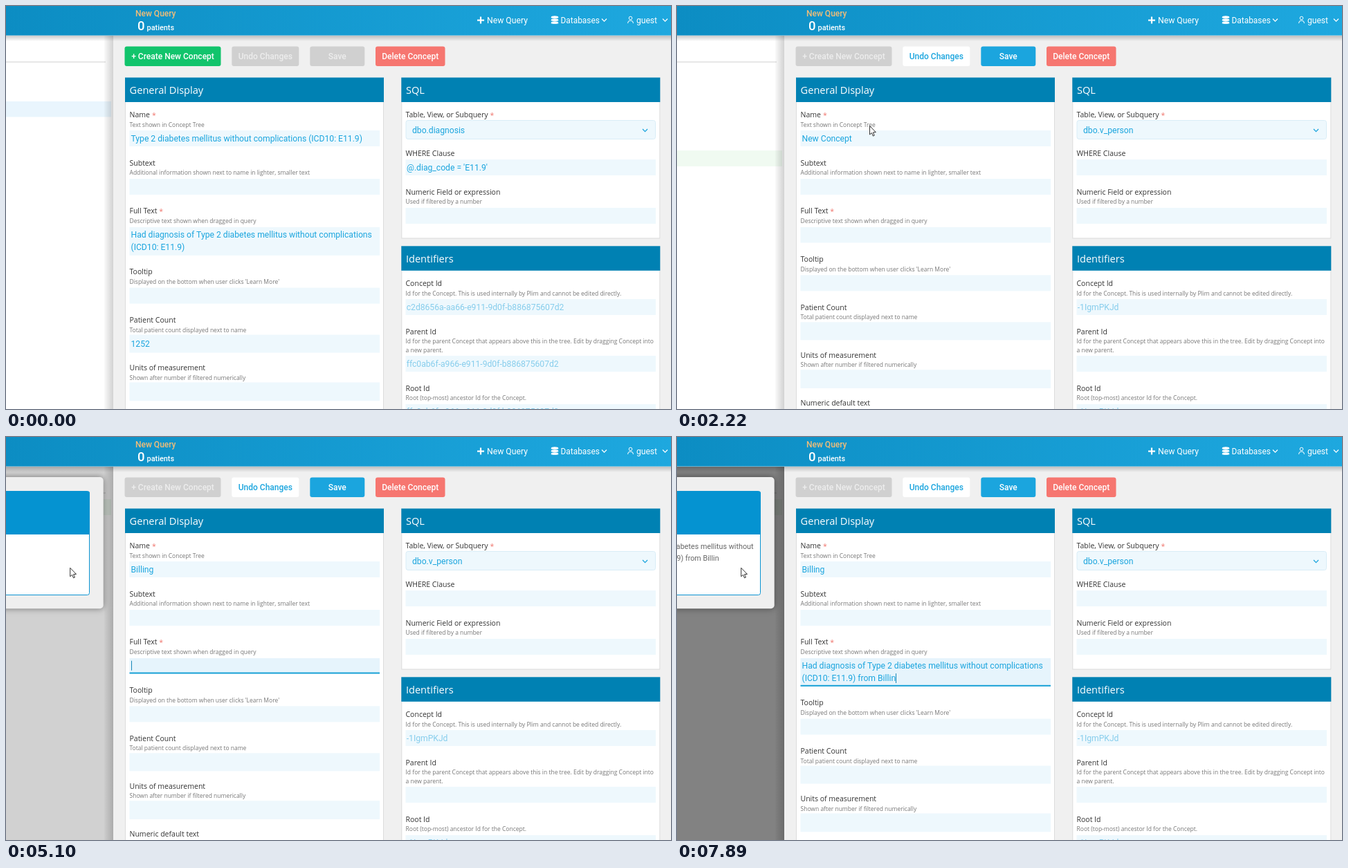
An HTML page with a canvas for the animation above (8000 ms loop, 961 by 583 pixels).

```html
<!DOCTYPE html>
<html lang="en">
<head>
<meta charset="utf-8">
<title>Concept editor</title>
<style>
html, body { margin: 0; width: 100%; height: 100%; overflow: hidden; background: #f0f0f0; }
canvas { display: block; width: 961px; height: 583px; }
</style>
</head>
<body>
<canvas id="stage" width="961" height="583"></canvas>
<script>
const ctx = document.getElementById('stage').getContext('2d');
const LOOP = 8000;
const CREATED = 1910, PASTED = 5800;
const EDGE = 155;
const BLUE = '#1ba5de', FIELD = '#eef8fd', FOCUS = '#e6f4fc', FADED = '#86cdec';
const ROBOTO = 'Roboto, sans-serif', OPEN = '"Open Sans", sans-serif';
const DIAGNOSIS = 'Type 2 diabetes mellitus without complications';
let t = 0;

// Drawing helpers. Text is placed by the middle of its capitals.
function text(s, x, y, size, color, weight = 500, family = ROBOTO, align = 'left') {
  ctx.font = `${weight} ${size}px ${family}`;
  ctx.fillStyle = color;
  ctx.textAlign = align;
  ctx.fillText(s, x, y + size * 0.355);
  return ctx.measureText(s).width;
}
const value = (s, x, y, color = BLUE) => text(s, x, y, 12.15, color, 400);
function rect(x, y, w, h, color) {
  ctx.fillStyle = color;
  ctx.fillRect(x, y, w, h);
}
function round(x, y, w, h, r, fill, stroke) {
  ctx.beginPath();
  ctx.roundRect(x, y, w, h, r);
  ctx.fillStyle = fill;
  ctx.fill();
  if (stroke) { ctx.strokeStyle = stroke; ctx.lineWidth = 1; ctx.stroke(); }
}
function shade(x, y, w, h, x1, y1, x2, y2, from, to) {
  const g = ctx.createLinearGradient(x1, y1, x2, y2);
  g.addColorStop(0, from);
  g.addColorStop(1, to);
  rect(x, y, w, h, g);
}
function line(points, color, width) {
  ctx.beginPath();
  points.forEach(([x, y]) => ctx.lineTo(x, y));
  ctx.strokeStyle = color;
  ctx.lineWidth = width;
  ctx.stroke();
}
function chevron(x, y, color) {
  line([[x - 3.5, y - 2], [x, y + 1.6], [x + 3.5, y - 2]], color, 1.3);
}

// Timing helpers.
const between = (a, b) => t >= a && t < b;
const typed = (s, times) => s.slice(0, times.filter(k => t >= k).length);
const latest = keys => keys.reduce((v, [k, next]) => t >= k ? next : v, keys[0][1]);
const stepped = (from, to, steps) =>
  Math.min(1, Math.max(0, Math.floor((t - from) / (to - from) * (steps - 1) + 0.01) / (steps - 1)));
const mix = (a, b, p) => a + (b - a) * p;
const glide = (a, b, p) => [mix(a[0], b[0], p), mix(a[1], b[1], p)];

function caret(x, y) { rect(Math.round(x), y - 7, 1, 14, '#1787b8'); }

function header() {
  shade(0, 43, 961, 8, 0, 43, 0, 51, 'rgba(0,0,0,.2)', 'rgba(0,0,0,0)');
  shade(0, 0, 961, 42.6, 0, 0, 961, 0, '#0c8dc3', '#1ea8df');
  text('New Query', 187, 10.5, 12, '#f2bd78');
  text('0', 190, 28.5, 18.5, '#fff');
  text('patients', 203.5, 31, 10.9, '#fff');
  rect(681, 19.5, 10, 2.2, '#fff');
  rect(684.9, 15.5, 2.2, 10, '#fff');
  text('New Query', 695, 21, 12.2, '#fff', 400);
  ctx.fillStyle = '#fff';
  for (const y of [16, 20, 24]) {
    ctx.beginPath();
    ctx.ellipse(793, y, 5.2, 1.8, 0, 0, Math.PI * 2);
    ctx.fill();
    ctx.fillRect(787.8, y, 10.4, 1.4);
  }
  text('Databases', 801.5, 21, 11.9, '#fff', 400);
  chevron(864.5, 20.5, '#fff');
  ctx.strokeStyle = '#fff';
  ctx.lineWidth = 1;
  ctx.beginPath();
  ctx.arc(902.5, 17.5, 2.3, 0, Math.PI * 2);
  ctx.stroke();
  ctx.beginPath();
  ctx.arc(902.5, 25, 4, Math.PI, 0);
  ctx.stroke();
  text('guest', 911, 21, 12.1, '#fff', 400);
  chevron(952.5, 20.5, '#fff');
}

function button(label, x, w, fill, color) {
  round(x, 58.5, w, 28.5, 3, fill);
  text(label, x + w / 2, 72.8, 12, color, 500, ROBOTO, 'center');
}
function buttons() {
  const fresh = t >= CREATED, hover = t >= 820;
  const off = '#d0d0d0', dim = '#ededed';
  button('+ Create New Concept', 171.5, 139, fresh ? off : hover ? '#0fa35c' : '#12c46c', fresh ? dim : '#fff');
  button('Undo Changes', 326.3, 97, fresh ? '#fff' : off, fresh ? BLUE : dim);
  button('Save', 439.3, 79, fresh ? BLUE : off, fresh ? '#fff' : dim);
  button('Delete Concept', 534, 100.5, '#f67670', '#fff');
}

function card(title, x, y, h) {
  rect(x, y, 374, h, '#dcdcdc');
  rect(x + 1, y, 372, h - 1, '#fff');
  rect(x, y, 374, 35.5, '#0081b3');
  text(title, x + 6.6, y + 18.3, 14.6, '#fff', 500, OPEN);
}
function label(name, x, y, help = [], required = false) {
  const w = text(name, x, y, 10.5, '#333', 400, OPEN);
  if (required) text('*', x + w + 3, y + 1, 10.5, '#f0776f', 400, OPEN);
  [].concat(help).forEach((s, i) => text(s, x, y + 14.2 + i * 12.7, 8.5, '#777', 400, OPEN));
}
function field(x, y, h, focused = false) {
  rect(x, y, 361.5, h, focused ? FOCUS : FIELD);
  if (focused) rect(x, y + h - 2, 361.5, 2, '#18a1d6');
}

function general() {
  const fresh = t >= CREATED;
  const wrapped = !fresh || t >= PASTED;
  const shift = wrapped ? 18.3 : 0;
  const X = 178.5, TX = 180.5;
  card('General Display', 172, 103.5, 500);

  label('Name', X, 157.5, 'Text shown in Concept Tree', true);
  const nameFocus = between(2600, 4780);
  field(X, 180, 23, nameFocus);
  const name = !fresh ? DIAGNOSIS + ' (ICD10: E11.9)'
    : t < 3530 ? 'New Concept'
    : typed('Billing', [3530, 3620, 3770, 3910, 4080, 4160, 4310]);
  const nameW = value(name, TX, 191.3);
  if (between(2680, 3530)) {
    const start = t < 2750 ? nameW / 2 : 0;
    rect(TX + start, 184, nameW - start, 15, '#338fff');
    ctx.save();
    ctx.beginPath();
    ctx.rect(TX + start, 183, nameW, 18);
    ctx.clip();
    value(name, TX, 191.3, '#fff');
    ctx.restore();
  } else if (nameFocus) caret(TX + nameW, 191.3);

  label('Subtext', X, 227, 'Additional information shown next to name in lighter, smaller text');
  const subFocus = between(4780, 5010);
  field(X, 250, 23, subFocus);
  if (subFocus) caret(TX, 261.5);

  label('Full Text', X, 296.7, 'Descriptive text shown when dragged in query', true);
  field(X, 320, 22.5 + shift, t >= 5010);
  if (wrapped) {
    value('Had diagnosis of ' + DIAGNOSIS, TX, 330.7);
    const w = value('(ICD10: E11.9)' + tail(), TX, 349);
    if (t >= 6500) caret(TX + w, 349);
  } else if (between(5010, 5490)) caret(TX, 330.7);

  label('Tooltip', X, 366.4 + shift, "Displayed on the bottom when user clicks 'Learn More'");
  field(X, 389.3 + shift, 23);
  label('Patient Count', X, 436 + shift, 'Total patient count displayed next to name');
  field(X, 457.3 + shift, 26);
  if (!fresh) value('1252', TX, 489);
  label('Units of measurement', X, 505 + shift, 'Shown after number if filtered numerically');
  field(X, 526.2 + shift, 26.8);
  label('Numeric default text', X, 574.5 + shift);
}

function tail() {
  return typed(' from Billin', [6350, 6420, 6650, 6725, 6800, 6950, 7180, 7350, 7500, 7650, 7890, 7890]);
}

function details() {
  const fresh = t >= CREATED, X = 577.5;
  card('SQL', 571.3, 103.5, 233);
  label('Table, View, or Subquery', X, 157.5, [], true);
  round(X + .5, 165.5, 360.5, 27, 3, FIELD, '#d9edf7');
  value(fresh ? 'dbo.v_person' : 'dbo.diagnosis', 587, 179.7);
  chevron(923.5, 180, BLUE);
  label('WHERE Clause', X, 213);
  field(X, 222, 23);
  if (!fresh) value("@.diag_code = 'E11.9'", 579, 233.5);
  label('Numeric Field or expression', X, 269, 'Used if filtered by a number');
  field(X, 292, 23);

  card('Identifiers', 571.3, 347.3, 260);
  const id = fresh ? '-1IgmPKJd' : 'c2d8656a-aa66-e911-9d0f-b886875607d2';
  const parent = 'ffc0ab6f-a966-e911-9d0f-b886875607d2';
  label('Concept Id', X, 401.3, 'Id for the Concept. This is used internally by Plim and cannot be edited directly.');
  field(X, 424, 23);
  value(id, 578.7, 435.3, FADED);
  label('Parent Id', X, 471, ['Id for the parent Concept that appears above this in the tree. Edit by dragging Concept into', 'a new parent.']);
  field(X, 506, 23);
  if (!fresh) value(parent, 578.7, 517.3, FADED);
  label('Root Id', X, 553, 'Root (top-most) ancestor Id for the Concept.');
  field(X, 576, 23);
  value(fresh ? id : parent, 578.7, 586.3, FADED);
}

function tree() {
  rect(0, 43, EDGE, 540, '#fff');
  rect(0, 80.5, 144, 1, '#cfcfcf');
  if (t < CREATED) rect(0, 138, 152, 22.5, '#e9f5fd');
  else rect(0, latest([[0, 209], [2300, 140], [2380, 90]]), 152, 23, '#f0faf1');
  if (between(2750, 5010)) {
    rect(0, 185, 152, 23, '#e9f5fd');
    round(65.5, 207.5, 86, 28, 2, '#fff', '#e2e2e2');
    [[71, 5], [75, 10], [79, 7]].forEach(([x, h]) => rect(x, 226 - h, 2.6, h, '#c0c0c0'));
    text('Learn More', 88.5, 221, 11.2, '#bdbdbd');
  }
  if (t >= 5010) modal();
  shade(142, 43, EDGE - 142, 540, 142, 0, EDGE, 0, 'rgba(0,0,0,.02)', 'rgba(0,0,0,.18)');
}

function modal() {
  const dim = latest([[5010, .07], [5100, .18], [5180, .3], [5250, .4], [5490, .46], [5560, .49]]);
  rect(0, 43, EDGE, 540, `rgba(0,0,0,${dim})`);
  ctx.save();
  ctx.beginPath();
  ctx.rect(0, 43, EDGE, 540);
  ctx.clip();
  ctx.shadowColor = 'rgba(0,0,0,.45)';
  ctx.shadowBlur = 10;
  round(-20, 58, 160.7, 190.3, 5, '#efefef');
  ctx.restore();
  round(-10, 78.5, 130.5, 150, 3, '#fff', '#0b94d2');
  round(-10, 78.5, 131, 62.5, [3, 3, 0, 0], '#0593d1');
  if (t >= PASTED) {
    text('diabetes mellitus without', 110.6, 158.5, 10.8, '#666', 400, ROBOTO, 'right');
    text('9)' + tail(), -0.6, 175, 10.8, '#666', 400);
  }
}

// Pointer shapes, relative to the hot spot.
function shape(points, x, y, join = 'miter') {
  ctx.beginPath();
  points.forEach(([px, py]) => ctx.lineTo(x + px, y + py));
  ctx.closePath();
  ctx.lineJoin = join;
  ctx.fillStyle = '#fff';
  ctx.fill();
  ctx.strokeStyle = '#333';
  ctx.lineWidth = 1;
  ctx.stroke();
}
const ARROW = [[0, 0], [0, 12.5], [2.9, 10], [4.8, 14.6], [6.7, 13.8], [4.9, 9.3], [8.8, 9.1]];
const POINT = [[-1.5, 0], [.7, 0], [.8, 5.5], [3, 5.5], [5, 6.3], [7, 7.3], [7, 12], [5.5, 16.5], [-1, 16.5], [-4.5, 11.5], [-4.2, 9.5], [-1.5, 10.8]];
const GRAB = [[-4.7, -5.3], [-3.2, -5.7], [-1.7, -2], [-1.4, -7], [.6, -7], [1, -2.5], [2.3, -6.2], [3.9, -5.8], [3.6, -1.5], [5.2, -3.9], [6.6, -3], [5, 4], [3.6, 7.6], [-2.8, 7.6], [-6.8, 1.4], [-5.7, .2], [-3.4, 1.9]];

function pointer() {
  if (t < 130) return;
  if (t < CREATED) {
    let p = stepped(130, 900, 11);
    p = p * (2 - p);
    const pos = t < 980 ? glide([633, 416], [258, 71], p)
      : glide([252, 71], [232, 70.5], stepped(980, 1200, 4));
    if (t >= 1750) {
      ctx.fillStyle = t < 1830 ? 'rgba(150,225,30,.85)' : 'rgba(150,225,30,.45)';
      ctx.beginPath();
      ctx.arc(230.5, 69, 10, 0, Math.PI * 2);
      ctx.fill();
    }
    shape(t < 820 ? ARROW : POINT, ...pos, 'round');
  } else if (t < 2300) {
    shape(ARROW, ...glide([232, 72], [278.5, 173.5], stepped(1910, 2220, 5)));
  } else if (t < 3440) {
    const x = latest([[0, 266], [2380, 255], [2680, 215], [2750, 92]]);
    line([[x - 2, 184], [x + 3, 184]], '#333', 1);
    line([[x + .5, 184], [x + .5, 198]], '#333', 1);
    line([[x - 2, 198], [x + 3, 198]], '#333', 1);
  } else if (t < 5010) {
    shape(GRAB, 92, 188.5, 'round');
    for (const dx of [-1.7, 1, 3.6]) line([[92 + dx, 185.5], [92 + dx, 189]], '#222', .9);
  } else shape(ARROW, 92.7, 189.3);
}

function draw(now) {
  t = now % LOOP;
  rect(0, 0, 961, 583, '#f0f0f0');
  tree();
  header();
  buttons();
  general();
  details();
  pointer();
  requestAnimationFrame(draw);
}
requestAnimationFrame(draw);
</script>
</body>
</html>
```
